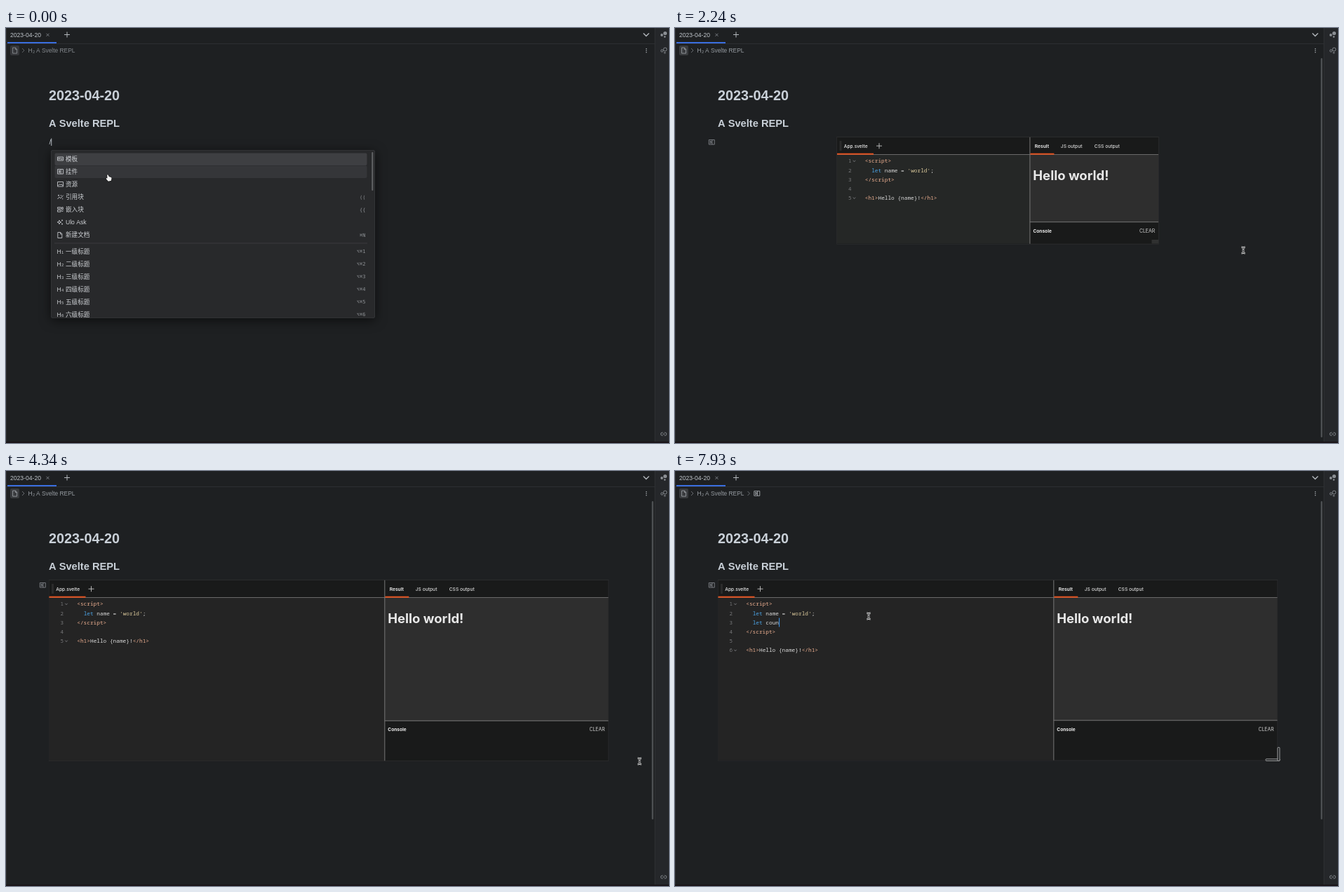
Animation of 945 by 592 pixels, one loop 8000 ms. Source, as an HTML page with a canvas:

```html
<!DOCTYPE html>
<html lang="zh">
<head>
<meta charset="utf-8">
<title>Widget demo</title>
<style>
html, body { margin: 0; width: 100%; height: 100%; overflow: hidden; background: #1e2022; }
canvas { display: block; width: 945px; height: 592px; }
</style>
</head>
<body>
<canvas id="stage" width="945" height="592"></canvas>
<script>
const ctx = document.getElementById('stage').getContext('2d');
const LOOP = 8000;
const SANS = '"Liberation Sans", "Noto Sans CJK SC", "Noto Sans CJK", sans-serif';
const UI = 'Inter, sans-serif';
const MONO = '"Noto Sans Mono", "DejaVu Sans Mono", monospace';
const KEYS = '"DejaVu Sans Mono", "DejaVu Sans", monospace';
const CH = 4.67, ROW = 13.2;
const TAG = '#eeb091', KEY = '#4ba4e6', STR = '#dcca9c', PLAIN = '#dadada';

const ICONS = {
  widget: 'M.5 .5h8v6.6h-8zM5.2 .5v6.6M1.8 2.4h2v2.8h-2M1.8 3.8h2',
  doc: 'M.8 .5h4l2 2.2v5.8h-6zM4.6 .6v2.4h2.2',
  template: 'M.5 1h8v5h-8zM2 4.7v-2.3l1 1 1-1v2.3M6.3 2.4v2.3l-1-1M6.3 4.7l1-1',
  image: 'M.5 .5h8v6.6h-8zM1.5 6l2-2.4 1.4 1.4 1.2-1.4 1.6 2.4',
  ref: 'M.5 7l2.4-2.8 2 1.8 3.6-4.4M2 .8v2M1 1.8h2M5.4 1.2v1.6M7.7 5.8v1.6',
  embed: 'M.5 .8h4.6v2h-4.6zM.5 4.6h4.6v2.6h-4.6zM6.5 .8h1.8v3h-1.8zM6.4 5.4l1 1.6 1-1.6',
  spark: 'M3 1.2l.8 2 2 .8-2 .8-.8 2-.8-2-2-.8 2-.8zM7 .4v2M6 1.4h2M7 5.6v2M6 6.6h2',
  link: 'M3.4 .6h-1a2 2 0 0 0 0 4.2h1M5.4 .6h1a2 2 0 0 1 0 4.2h-1M2.8 2.7h3.2'
};

function rect(x, y, w, h, color) {
  ctx.fillStyle = color;
  ctx.fillRect(x, y, w, h);
}

function round(x, y, w, h, r, color) {
  ctx.beginPath();
  ctx.roundRect(x, y, w, h, r);
  ctx.fillStyle = color;
  ctx.fill();
}

function stroke(d, x, y, color, width = 0.9) {
  ctx.save();
  ctx.translate(x, y);
  ctx.strokeStyle = color;
  ctx.lineWidth = width;
  ctx.stroke(new Path2D(d));
  ctx.restore();
}

function circle(x, y, r, color, width) {
  ctx.beginPath();
  ctx.arc(x, y, r, 0, 7);
  ctx.fillStyle = ctx.strokeStyle = color;
  ctx.lineWidth = width || 1;
  if (width) ctx.stroke(); else ctx.fill();
}

// y is the middle of the capital letters
function text(str, x, y, size, color, family = SANS, weight = 400, align = 'left') {
  ctx.font = `${weight} ${size}px ${family}`;
  ctx.textAlign = align;
  ctx.fillStyle = color;
  ctx.fillText(str, x, y + size * 0.36);
}

function heading(level, x, y, color) {
  text('H', x, y, 8.6, color);
  text(level, x + 6.4, y + 1.6, 5.8, color);
}

function between(keys, t) {
  let i = 0;
  while (i < keys.length - 1 && t >= keys[i + 1][0]) i++;
  const a = keys[i], b = keys[i + 1] || a;
  const k = b === a ? 0 : Math.max(0, (t - a[0]) / (b[0] - a[0]));
  return [a[1] + (b[1] - a[1]) * k, a[2] + (b[2] - a[2]) * k];
}

const POINTER = [
  [1790, 146, 210], [1940, 390, 250], [2090, 690, 304], [2240, 810, 317], [2390, 796, 316],
  [2690, 712, 314], [2840, 694, 311], [2990, 691, 308], [3590, 691, 308], [4190, 876, 406],
  [4340, 903, 414], [4640, 903, 414], [4940, 790, 345], [5240, 480, 255], [5540, 240, 210],
  [5690, 215, 206], [5990, 161, 214], [6290, 250, 231], [6440, 290, 230], [6740, 276, 207]
];

// the right and bottom edges of the widget while it is dragged
const SIZE = [[3590, 458, 153], [4190, 797, 250], [4340, 797, 258.5]];

function chrome(t) {
  rect(0, 0, 945, 592, '#1e2022');
  rect(0, 22, 925, 1, '#2d2f32');
  rect(0, 0, 1, 592, '#2b2c2e');
  rect(925, 0, 20, 592, '#25272a');
  rect(924.5, 0, 1, 592, '#303235');
  rect(0, 590, 945, 2, '#191418');
  rect(2, 20, 70, 2, '#3a6ee0');
  text('2023-04-20', 6, 10, 8.6, '#bfc4ca');
  stroke('M0 0l4 4M4 0l-4 4', 57.5, 7.8, '#8d9298', 0.8);
  stroke('M4 0v8M0 4h8', 83, 5.5, '#b4b8bd', 1);
  stroke('M0 0l4 4 4-4', 908.5, 7.5, '#b8bcc1', 1.3);
  for (let i = 0; i < 3; i++) rect(912, 29 + i * 2.5, 1.3, 1.3, '#a9adb2');

  circle(939.5, 7.5, 2.6, '#8a8e93');
  circle(934.8, 10, 1.9, '#8a8e93');
  circle(939, 12.5, 1.3, '#8a8e93');
  circle(939.5, 30.5, 2.4, '#8a8e93', 0.9);
  circle(935, 32.5, 1.6, '#8a8e93', 0.9);
  circle(939, 35.3, 1, '#8a8e93', 0.8);
  stroke(ICONS.link, 933, 576.5, '#83878c', 1);

  text('2023-04-20', 61, 95.5, 19.75, '#c9d0d8', SANS, 700);
  text('A Svelte REPL', 61, 136, 14.66, '#c9d0d8', SANS, 700);
  if (t >= 1040) {
    round(920.6, 43, 2, t < 4340 ? 541 : 454, 1, '#55585b');
    stroke(ICONS.widget, 47.8, 159, '#7f8388');
  }
}

function breadcrumb(t) {
  const fade = t < 150 ? 0.85 : t < 300 ? 0.6 : t < 600 ? 0.4 : t < 1940 ? 0 : 1;
  if (!fade) return;
  ctx.globalAlpha = fade;
  round(6, 25, 13, 14, 2, '#393b3e');
  stroke(ICONS.doc, 8.8, 27.6, '#a4a9ae', 0.8);
  stroke('M0 0l3 3-3 3', 23, 29, '#7d8186', 0.8);
  heading('2', 31.5, 32, '#959a a0'.replace(' ', ''));
  text('A Svelte REPL', 43, 32, 8.4, '#959aa0');
  if (t >= 5690) {
    stroke('M0 0l3 3-3 3', 103.5, 29, '#7d8186', 0.8);
    stroke(ICONS.widget, 112.3, 28.2, '#a4a9ae');
  }
  ctx.globalAlpha = 1;
}

const ITEMS = [
  ['template', '模板', ''], ['widget', '挂件', ''], ['image', '资源', ''], ['ref', '引用块', '(('],
  ['embed', '嵌入块', '{{'], ['spark', 'Ulo Ask', ''], ['doc', '新建文档', '⌘N']
];

function menu(t) {
  text('/', 61.5, 162.5, 9.8, '#c9d0d8');
  rect(64.3, 157.5, 0.9, 10.5, '#c9d0d8');
  ctx.save();
  ctx.shadowColor = 'rgba(0,0,0,.6)';
  ctx.shadowBlur = 16;
  ctx.shadowOffsetY = 3;
  round(64, 174, 462, 240, 3, '#3a3c3f');
  ctx.restore();
  round(64.6, 174.6, 460.8, 238.8, 3, '#28292b');

  ctx.save();
  ctx.beginPath();
  ctx.rect(65, 175, 460, 238.4);
  ctx.clip();
  round(69.5, 178.5, 445, 17.5, 2, t < 150 ? '#3e3f42' : t < 300 ? '#3a3b3e' : '#38393c');
  round(69.5, 196.5, 445, 17.5, 2, '#353639');
  ITEMS.forEach(([icon, label, keys], i) => {
    const y = 187 + i * 18;
    stroke(ICONS[icon], 73, y - 4, '#c3c6ca');
    text(label, 85, y, 8.6, '#ced1d5');
    text(keys, 512.5, y, 7, '#8e9195', KEYS, 400, 'right');
  });
  rect(69, 306.5, 446, 1, '#3a3b3e');
  [...'一二三四五六'].forEach((n, i) => {
    const y = 318.8 + i * 18;
    heading(String(i + 1), 72.5, y, '#c3c6ca');
    text(n + '级标题', 85, y, 8.6, '#ced1d5');
    text('⌥⌘' + (i + 1), 512.5, y, 7, '#8e9195', KEYS, 400, 'right');
  });
  ctx.restore();
  round(521.3, 177, 2, 55, 1, '#626467');
}

function source(t) {
  const lines = [
    [['<script>', TAG]],
    [['  ', PLAIN], ['let', KEY], [' name = ', PLAIN], ["'world'", STR], [';', PLAIN]],
    [['<\/script>', TAG]],
    [],
    [['<h1>', TAG], ['Hello {name}!', PLAIN], ['</h1>', TAG]]
  ];
  if (t >= 7040) {
    const typed = 'let coun'.slice(0, typedLength(t));
    const isLet = typed.startsWith('let');
    lines.splice(2, 0, [['  ', PLAIN], [typed.slice(0, 3), isLet ? KEY : PLAIN], [typed.slice(3), PLAIN]]);
  }
  return lines;
}

function typedLength(t) {
  return t < 7340 ? 0 : t < 7490 ? 1 : t < 7640 ? 3 : t < 7790 ? 4 : t < 7930 ? 6 : 8;
}

function editor(x, t) {
  const ready = t >= 1340;
  const left = x + (ready ? 39.8 : 36);
  const lines = source(t);
  lines.forEach((parts, i) => {
    const y = 189.6 + i * ROW;
    let col = 0;
    for (const [str, color] of parts) {
      text(str, left + col * CH, y, 7.78, ready ? color : PLAIN, MONO);
      col += str.length;
    }
    if (!ready) return;
    text(String(i + 1), x + 20.6, y, 7.6, '#77787a', MONO, 400, 'right');
    if (i === 0 || i === lines.length - 1) stroke('M0 0l1.7 2 1.7-2', x + 22.8, y - 0.8, '#85868a', 0.8);
  });
  const blink = t >= 6140 && t < 6590;
  if (t >= 5690 && !blink) {
    const row = t < 7040 ? 1 : 2;
    const col = row === 1 ? 21 : 2 + typedLength(t);
    rect(left + col * CH, 196.4 + (row - 1) * ROW, 1.1, 12.8, '#3b8fe0');
  }
}

function loader(x, y, label) {
  circle(x + 13.5, y, 6, '#f0f0f3', 1.4);
  rect(x + 13, y - 3, 1.1, 3.6, '#f0f0f3');
  rect(x + 13, y + 1.8, 1.1, 1.2, '#f0f0f3');
  text(label, x + 26, y + 0.3, 6.65, '#f0f0f3', UI, 500);
}

function repl(t) {
  let [w, h] = between(SIZE, t);
  if (t >= 4940) h = 257.8;
  const x = 460 - w / 2, y = 155, right = x + w, bottom = y + h;
  const split = x + w * 0.6, top = y + 25.5, console = top + (h - 25.5) * 0.754;
  const ready = t >= 1340;

  rect(x - 0.5, y, w + 1, h + 0.5, '#303132');
  rect(x, y + 0.8, w, h - 1, '#191a1a');
  rect(x, top, split - x, bottom - top - 0.5, t < 3740 && ready ? '#252726' : '#242424');
  rect(split, top, right - split, console - top, '#2e2e2e');
  rect(x, top - 0.5, w, 1, '#696969');
  rect(split, console - 0.4, right - split, 1, '#777');
  rect(split - 0.4, y + 0.8, 1, h - 1, '#777');

  rect(x + 3.5, y + 6, 3, 14, '#2b2b2b');
  text('App.svelte', x + 9.8, 168.2, 6.6, '#ececec', UI, 500);
  stroke('M4 0v8M0 4h8', x + 56, 164.2, '#c4c4c4', 0.9);
  rect(x, top - 1.8, 52, 2, '#e3521f');
  text('Result', split + 7, 168.2, 6.7, '#f2f2f2', UI, 600);
  text('JS output', split + 44, 168.2, 6.7, '#dadada', UI, 500);
  text('CSS output', split + 92, 168.2, 6.7, '#dadada', UI, 500);
  rect(split + 0.6, top - 1.8, 34, 2, '#e3521f');
  editor(x, t);

  if (ready) {
    text('Hello world!', split + 4.5, 210, 18.5, '#e8e8e8', UI, 700);
    text('Console', split + 4.6, console + 12.6, 6.6, '#f0f0f0', UI, 700);
    text('CLEAR', right - 4.8, console + 12.6, 6.9, '#d0d0d0', UI, 400, 'right');
    if (t < 3740) rect(right - 9.5, bottom - 6, 9.5, 5.5, '#303131');
  } else {
    rect(x, 281, w, 27, '#686879');
    rect(x, 280.6, w, 1, '#c9c9cf');
    rect(split, 282, 0.8, 26, '#616172');
    loader(x, 294.7, 'loading editor...');
    loader(split, 294.7, 'loading Svelte compiler...');
  }
  const held = t < 1940 || (t >= 2990 && t < 4340) || t >= 4940;
  if (held) handle(right, bottom);
}

function handle(x, y) {
  for (const [dx, dy, w, h] of [[-16.5, -2, 20, 2.6], [0.4, -18.5, 3, 19.1]]) {
    ctx.beginPath();
    ctx.roundRect(x + dx, y + dy, w, h, 0.8);
    ctx.fillStyle = '#1e2022';
    ctx.fill();
    ctx.strokeStyle = '#b9babc';
    ctx.lineWidth = 0.8;
    ctx.stroke();
  }
}

function hand(x, y) {
  const d = new Path2D('M-1.8 -4.4q1-.8 1.7.4l.8 2 3 1q1 .4.8 1.6l-.6 3.2-4 1-2.4-2.6-1-1.8q.8-.9 1.9.2z');
  ctx.save();
  ctx.translate(x, y);
  ctx.strokeStyle = '#111';
  ctx.lineWidth = 1.2;
  ctx.stroke(d);
  ctx.fillStyle = '#f4f4f4';
  ctx.fill(d);
  ctx.restore();
}

function pointer(t) {
  const [x, y] = between(POINTER, t);
  if (t < 600) return hand(146, 214);
  const drag = t >= 2990 && t < 4340;
  const d = drag
    ? 'M-3 -3l6 6M-3.2 -.4v-2.8h2.8M3.2 .4v2.8h-2.8'
    : 'M-2.6 -4.2q2.6 0 2.6 1.6q0-1.6 2.6-1.6M0 -2.6v5.2M-2.6 4.2q2.6 0 2.6-1.6q0 1.6 2.6 1.6M-1.4 .8h2.8';
  stroke(d, x, y, '#e6e6e6', 2.4);
  stroke(d, x, y, '#17181a', 0.8);
}

function snap(t) {
  if (t >= 7930) return 7940;
  const start = t < 1040 ? 0 : 1040;
  return start + Math.floor((t - start) / 150) * 150;
}

function draw(now) {
  const t = snap(now % LOOP);
  chrome(t);
  breadcrumb(t);
  if (t < 600) menu(t);
  if (t >= 1040) repl(t);
  pointer(t);
  requestAnimationFrame(draw);
}
requestAnimationFrame(draw);
</script>
</body>
</html>
```
